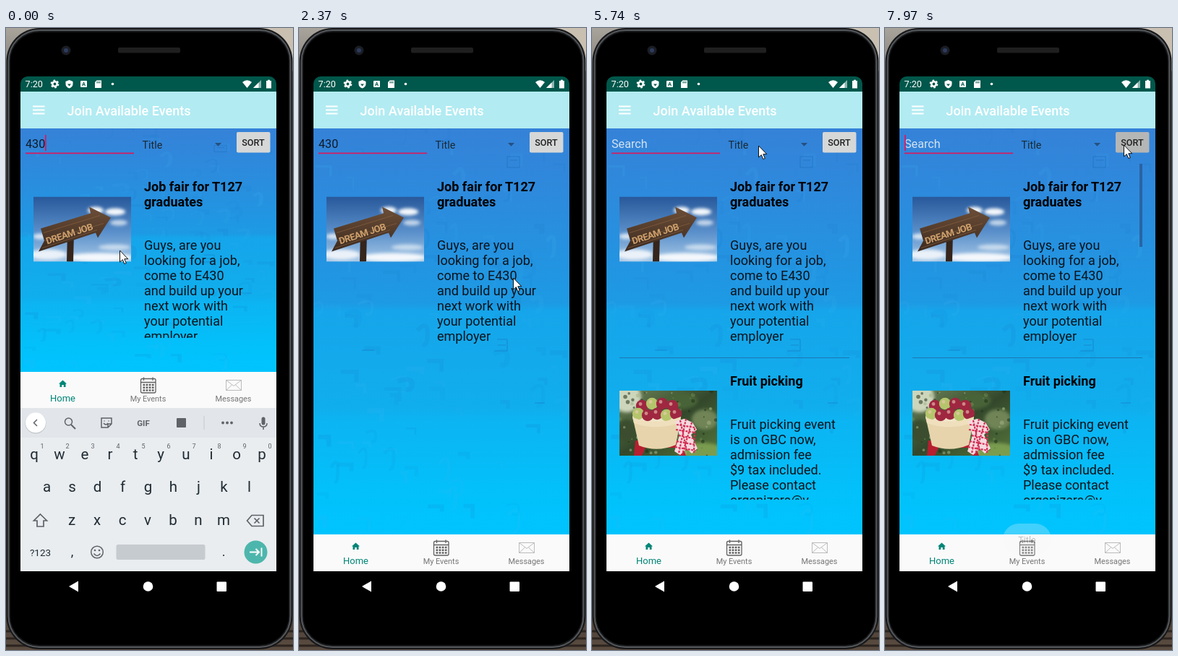
These frames come from a looping animation (397x861 px, 8 s). An HTML page:

```html
<!DOCTYPE html>
<html lang="en">
<head>
<meta charset="utf-8">
<title>Event list</title>
<style>
html, body { margin: 0; width: 100%; height: 100%; overflow: hidden; background: #000; }
svg { display: block; width: 100%; height: 100%; }
text { font-family: Roboto, sans-serif; white-space: pre; }
.mid { text-anchor: middle; }
.b { font-weight: 700; }
.line { fill: none; stroke: #5f6368; stroke-width: 1.5; }
</style>
</head>
<body>
<svg id="stage" viewBox="0 0 397 861" xmlns="http://www.w3.org/2000/svg">
  <defs>
    <linearGradient id="desk" x2="0" y2="1">
      <stop offset="0" stop-color="#a8a49c"/><stop offset=".1" stop-color="#77726b"/>
      <stop offset=".9" stop-color="#3f362f"/><stop offset="1" stop-color="#5b4c40"/>
    </linearGradient>
    <linearGradient id="sea" x2="0" y2="1">
      <stop offset="0" stop-color="#3582d8"/><stop offset=".2" stop-color="#2b8cdd"/>
      <stop offset=".43" stop-color="#1d9ae4"/><stop offset=".45" stop-color="#16a5ea"/>
      <stop offset=".69" stop-color="#10aeed"/><stop offset=".72" stop-color="#0cb4f2"/>
      <stop offset=".9" stop-color="#02c1fb"/><stop offset="1" stop-color="#00c4fe"/>
    </linearGradient>
    <linearGradient id="sky" x2="0" y2="1">
      <stop offset="0" stop-color="#28589a"/><stop offset=".55" stop-color="#5a90cb"/>
      <stop offset="1" stop-color="#a9c9e6"/>
    </linearGradient>
    <linearGradient id="wood" x2="0" y2="1">
      <stop offset="0" stop-color="#6d4f38"/><stop offset="1" stop-color="#3c2a1f"/>
    </linearGradient>
    <linearGradient id="leaf" x2="1" y2="1">
      <stop offset="0" stop-color="#6f8459"/><stop offset=".5" stop-color="#33482b"/>
      <stop offset="1" stop-color="#55753c"/>
    </linearGradient>
    <filter id="soft"><feGaussianBlur stdDeviation="2.2"/></filter>
    <clipPath id="screen"><path d="M20 752V77a10 10 0 0 1 10-10H364a10 10 0 0 1 10 10V752Z"/></clipPath>
    <clipPath id="photo"><rect width="135" height="90"/></clipPath>
    <clipPath id="rowClip"><rect id="rowBox" x="180" y="188" width="180" height="241"/></clipPath>
    <clipPath id="row2Clip"><rect x="180" y="460" width="180" height="193"/></clipPath>
  </defs>

  <rect width="397" height="861" fill="url(#desk)"/>
  <path d="M340 0H397V60Z" fill="#c9c0b2"/>
  <path d="M0 835H397M0 845H397M0 855H397" stroke="#2b241f" stroke-width="3"/>
  <rect x=".5" y="0" width="396" height="860" rx="46" fill="#17181a"/>
  <rect x="3.500" y="3" width="390" height="854" rx="43" fill="none" stroke="#55585b" stroke-width="2"/>
  <rect x="6" y="6" width="385" height="848" rx="40" fill="#000"/>
  <circle cx="83" cy="31" r="6.500" fill="#1b1d24"/><circle cx="83" cy="31" r="3" fill="#2c3a5c"/>
  <rect x="155" y="27" width="86" height="7.500" rx="2" fill="#1f1f20"/>

  <g clip-path="url(#screen)">
    <g id="back"><rect width="354" height="562" fill="url(#sea)"/><g id="marks" fill="none"></g></g>

    <path d="M20 67H374V88H20Z" fill="#00574b"/>
    <g fill="#fff">
      <text x="26.500" y="82" font-size="12.700">7:20</text>
      <circle cx="67.500" cy="77.500" r="3.200" fill="none" stroke="#fff" stroke-width="2.600"/>
      <circle cx="67.500" cy="77.500" r="5" fill="none" stroke="#fff" stroke-width="1.800" stroke-dasharray="2.600 2.640"/>
      <path d="M87.500 72l5 2v3.500q0 4-5 6-5-2-5-6V74Z"/><path d="M85 77.500h5l-2.500 3Z" fill="#00574b"/>
      <rect x="103" y="73" width="9" height="9" rx="1"/>
      <text x="107.500" y="80.300" class="mid b" font-size="7.500" style="fill:#00574b">A</text>
      <path d="M125.500 72.500H132V83h-9v-8Z"/><path d="M126 74v2.500M128 74v2.500M130 74v2.500" stroke="#00574b"/>
      <circle cx="147.500" cy="77.500" r="1.800"/>
      <path d="M327 75q6.500-5.500 13 0l-6.500 8Z"/>
      <path d="M353 72v11h-11Z" opacity=".55"/><path d="M349.500 75.500V83H342Z"/>
      <path d="M360 73h2v-1.200h3V73h2v10.500h-7Z"/>
    </g>
    <path d="M20 88H374V139H20Z" fill="#b2ebf2"/>
    <path d="M37 108.500H53.500M37 113.500H53.500M37 118.500H53.500" stroke="#fff" stroke-width="1.800"/>
    <text x="84.500" y="120.800" font-size="18" font-weight="500" fill="#fff">Join Available Events</text>

    <text id="query" x="27" y="165.500" font-size="16.200">430</text>
    <path d="M27 173.300H177" stroke="#d81b60" stroke-width="1.800"/>
    <rect id="caret" y="148" width="1.800" height="22" fill="#d81b60"/>
    <text x="188.500" y="166.500" font-size="14.300" fill="#1c2733">Title</text>
    <path d="M289 159h9l-4.500 4.700Z" fill="#24507f"/>
    <rect id="sort" x="319" y="144" width="46.500" height="28.500" rx="2"/>
    <text x="342" y="163" class="mid" font-size="12.600" font-weight="500" fill="#222">SORT</text>

    <g transform="translate(38 233.500)" clip-path="url(#photo)">
      <rect width="135" height="90" fill="url(#sky)"/>
      <g fill="#f4f8fc" filter="url(#soft)">
        <ellipse cx="86" cy="19" rx="11" ry="5"/><ellipse cx="113" cy="21" rx="14" ry="5"/>
        <ellipse cx="118" cy="36" rx="12" ry="4" opacity=".7"/>
        <ellipse cx="10" cy="55" rx="11" ry="4" opacity=".8"/><ellipse cx="20" cy="80" rx="26" ry="7" opacity=".9"/>
        <ellipse cx="112" cy="70" rx="22" ry="4" opacity=".6"/><ellipse cx="92" cy="84" rx="46" ry="6"/>
      </g>
      <path d="M47 50h9l-1 40h-9Z" fill="#35251c"/>
      <path d="M10 44L79 23 77 14 107 29 89 57 86 50 7 76l8-15Z" fill="url(#wood)"/>
      <path d="M14 50L92 26M16 61L97 37M12 71L88 46" stroke="#8f6644" stroke-width="1" opacity=".6" fill="none"/>
      <text class="b" transform="translate(19 66) rotate(-18)" font-size="13" fill="#cda06c" letter-spacing="-.55">DREAM JOB</text>
    </g>
    <g clip-path="url(#rowClip)">
      <g id="first"></g>
    </g>
    <g id="more">
      <path d="M38 456.500H356" stroke="#1d76b2"/>
      <g transform="translate(38 502)" clip-path="url(#photo)">
        <rect width="135" height="90" fill="url(#leaf)"/>
        <g filter="url(#soft)">
          <ellipse cx="10" cy="10" rx="20" ry="20" fill="#cdd5bb"/><ellipse cx="118" cy="40" rx="18" ry="14" fill="#6f8456"/>
          <ellipse cx="86" cy="14" rx="22" ry="11" fill="#4a6338"/><ellipse cx="113" cy="84" rx="32" ry="12" fill="#7a9c50"/>
          <ellipse cx="10" cy="56" rx="14" ry="16" fill="#3a4d2d"/>
        </g>
        <g id="leaves"></g>
        <path d="M22 69H84L92 90H83L77 79H36L31 90H20Z" fill="#b51f30"/>
        <path d="M18 36Q52 28 85 36L78 75Q52 86 27 76Z" fill="#e7d4ac"/>
        <ellipse cx="51.500" cy="36" rx="33.500" ry="7" fill="#f0e4c8"/>
        <g id="apples"></g>
        <path d="M18 37Q51 50 85 36L84 44Q52 56 20 45Z" fill="#f0dfbc"/>
        <g id="cloth">
          <path d="M77 42l13-3 11 5 6 10-8 7 9 19-8 7-7-7-9 9-8-5 7-22Z" fill="#f6d9df"/>
          <path d="M79 47l25 4M78 54l27 4M82 62l20 4M79 70l26 5M77 78l28 5M84 41l9 42M92 39l-10 48M100 44l-13 44M104 52l-1 34" stroke="#d33156" stroke-width="2.200" stroke-dasharray="3 1.500" fill="none"/>
        </g>
      </g>
      <g clip-path="url(#row2Clip)"><g id="second"></g></g>
    </g>
    <rect id="bar" x="352" y="188" width="4" height="115" fill="#285d99" opacity=".85"/>

    <g id="menu">
      <rect x="180" y="140" width="93" height="132" rx="3" opacity=".22" filter="url(#soft)"/>
      <rect x="181" y="139" width="91" height="130" rx="2" fill="#f5f5f5"/>
      <path d="M181 139H272V182H181Z" fill="#d2d2d2"/>
      <g id="choices"></g>
    </g>

    <g id="nav">
      <path d="M20 0H374V51H20Z" fill="#fafafa"/>
      <path d="M78.500 11.500l5.500 5h-1.500V21h-2.700v-3h-2.600v3h-2.700v-4.500H73Z" fill="#008577"/>
      <text x="78.500" y="41" class="mid" font-size="13" fill="#008577">Home</text>
      <g fill="none" stroke="#616161" stroke-width="1.300">
        <rect x="186.500" y="9.500" width="20.500" height="19.500" rx="2"/><path d="M186.500 14.500h20.500M190.500 7.500v4.500M203 7.500v4.500"/>
        <path d="M189.500 18H204.500M189.500 21.800H204.500M189.500 25.600H204.500" stroke-width="2.500" stroke-dasharray="2.700 1.400"/>
      </g>
      <text x="196.500" y="41" class="mid" font-size="10.900" fill="#757575">My Events</text>
      <path d="M304.500 11.500h21v14h-21Zl10.500 8 10.500-8M304.500 25.500l8-7.500M325.500 25.500l-8-7.500" fill="none" stroke="#b5b5b5" stroke-width=".9"/>
      <text x="314.500" y="41" class="mid" font-size="10.900" fill="#757575">Messages</text>
    </g>

    <g id="keys">
      <path d="M20 526H374V752H20Z" fill="#e9edf0"/><path d="M20 526H374V567H20Z" fill="#e2e6ea"/>
      <circle cx="41" cy="547" r="14.500" fill="#bfc4c9"/><circle cx="41" cy="546.300" r="14" fill="#fff"/>
      <g class="line">
        <path d="M43 542l-4.500 4.500 4.500 4.500"/>
        <circle cx="86.500" cy="545" r="5"/><path d="M90 549l6 6" stroke-width="2"/>
        <path d="M132 540h14v8l-5 5h-9ZM146 548h-5v5M135 547q3.500 4 6 0M136 543.500v1M142 543.500v1"/>
        <path d="M274 537V556" stroke="#c5c9ce" stroke-width="1"/>
        <path d="M351 547q0 5 5 5t5-5M356 552v4"/>
        <path d="M47.500 673l9 9h-4.500v8h-9v-8h-4.500Z" stroke-width="1.700"/>
        <path d="M340 674.500H356v15H340L333.500 682ZM343.500 678.500l7 7M350.500 678.500l-7 7" stroke-width="1.700"/>
        <circle cx="126" cy="725.500" r="8.300"/><path d="M121.500 727.500q4.500 6 9 0"/>
      </g>
      <g fill="#5f6368">
        <text x="190" y="550.500" class="mid b" font-size="11.500">GIF</text>
        <rect x="236" y="540" width="13" height="13" rx="1"/>
        <circle cx="300" cy="546.500" r="1.900"/><circle cx="306" cy="546.500" r="1.900"/><circle cx="312" cy="546.500" r="1.900"/>
        <rect x="353.500" y="538.500" width="5" height="11" rx="2.500"/>
        <circle cx="123" cy="723" r="1.300"/><circle cx="129" cy="723" r="1.300"/>
      </g>
      <g id="letters" class="mid" fill="#202b33"></g>
      <rect x="152.500" y="715" width="123" height="21" rx="2.500" fill="#c6cbcf"/>
      <circle cx="345.500" cy="725.500" r="16" fill="#4db6ac"/>
      <path d="M337 725.500H350M345.500 721l4.500 4.500-4.500 4.500M353.500 719.500v12" fill="none" stroke="#fff" stroke-width="1.900"/>
    </g>

    <g id="toast">
      <rect x="163" y="686" width="67" height="44" rx="22" fill="#f8f8f8"/>
      <text x="196.500" y="713" class="mid" font-size="12.600" fill="#222">Title</text>
    </g>
  </g>

  <g fill="#fff">
    <path d="M87 773l13-7.500v15Z"/><circle cx="196.500" cy="773" r="6.800"/><rect x="291.500" y="766.500" width="13.500" height="13.500" rx="1"/>
  </g>
  <path id="pointer" d="M.5 0V16L4.300 12.600 6.800 18.500 9.300 17.500 6.800 11.700H11.800Z" fill="#fff" stroke="#111" stroke-width="1"/>
</svg>
<script>
const LOOP = 8000;
const el = id => document.getElementById(id);
const show = (node, on) => node.setAttribute('visibility', on ? 'visible' : 'hidden');
const clamp = v => Math.max(0, Math.min(1, v));
const ramp = (t, a, b) => clamp((t - a) / (b - a));
const smooth = k => k * k * (3 - 2 * k);

function add(parent, name, attrs, text) {
  const node = document.createElementNS('http://www.w3.org/2000/svg', name);
  for (const key in attrs) node.setAttribute(key, attrs[key]);
  if (text) node.textContent = text;
  el(parent).append(node);
}

function lines(parent, list, x, y, step, size, extra = {}) {
  list.forEach((s, i) => add(parent, 'text', { x, y: y + i * step, 'font-size': size, ...extra }, s));
}

const dark = { fill: '#0a141c' };
const bold = { class: 'b', fill: '#000' };
lines('first', ['Job fair for T127', 'graduates'], 191, 226, 21, 18, bold);
lines('first', ['Guys, are you', 'looking for a job,', 'come to E430', 'and build up your',
  'next work with', 'your potential', 'employer'], 191, 307, 21, 18, dark);
lines('second', ['Fruit picking'], 191, 494.5, 21, 18, bold);
lines('second', ['Fruit picking event', 'is on GBC now,', 'admission fee', '$9 tax included.',
  'Please contact', 'organizers@v'], 191, 555, 21, 18, dark);
lines('choices', ['Title', 'Start Date', 'Most recent'], 188.5, 166.5, 43, 14.3, { fill: '#222' });

[['qwertyuiop', 39, 596.5], ['asdfghjkl', 56.5, 641.5], ['zxcvbnm', 91, 687.5]].forEach(([row, x0, y], r) => {
  [...row].forEach((c, i) => {
    const x = x0 + i * 35;
    add('letters', 'text', { x, y, 'font-size': 20.5 }, c);
    if (!r) add('letters', 'text', { x: x + 11, y: 582, 'font-size': 9, fill: '#5f6368' }, String((i + 1) % 10));
  });
});
add('letters', 'text', { x: 47.5, y: 730.5, 'font-size': 13.5 }, '?123');
add('letters', 'text', { x: 91.5, y: 731, 'font-size': 18 }, ',');
add('letters', 'text', { x: 301, y: 731, 'font-size': 18 }, '.');

let seed = 11;
const rnd = () => (seed = seed * 16807 % 2147483647) / 2147483647;

// Faint hooks and blocks in the wallpaper
for (let i = 0; i < 110; i++) {
  const x = rnd() * 340, y = rnd() * 545, w = 8 + rnd() * 14, h = 6 + rnd() * 12;
  const d = i % 3 ? `M${x} ${y}h${w}v${h}` : `M${x} ${y}q${w} ${-h} ${w} 4t${-w / 2} ${h}`;
  add('marks', 'path', { d, stroke: rnd() < 0.6 ? '#1674c4' : '#45b8f4', 'stroke-width': 2 + rnd() * 5, opacity: 0.05 + rnd() * 0.09 });
}
add('marks', 'path', { d: 'M268 39h17v15h-17ZM272 44h10M254 292h14v16h-18M255 300h11M67 307h17M306 380h14', stroke: '#1763ad', opacity: 0.45 });

// Foliage behind the bucket, then the fruit in two rows
for (let i = 0; i < 90; i++) {
  add('leaves', 'circle', { cx: rnd() * 135, cy: rnd() * 90, r: 0.8 + rnd() * 2.2, fill: ['#1f3019', '#6d8a4c', '#a3b386'][i % 3], opacity: 0.55 });
}
for (let i = 0; i < 9; i++) {
  const back = i < 4;
  const x = back ? 31 + i * 14 : 26 + (i - 4) * 13;
  const y = back ? 21 - (i % 3 ? 3 : 0) : 32 + (i % 2) * 2;
  add('apples', 'circle', { cx: x, cy: y, r: 8.2, fill: i % 3 === 1 ? '#b5c56c' : '#9f2740' });
  add('apples', 'circle', { cx: x - 2, cy: y - 2.5, r: 2.4, fill: '#f0c9b8', opacity: 0.6 });
}

// time, x, y of the pointer tip
const path = [
  [0, 157, 308], [60, 158, 312], [400, 214, 540], [770, 92, 768], [1060, 92, 768], [1200, 112, 733],
  [1480, 210, 540], [1770, 322, 360], [1860, 323, 361], [2370, 296, 346], [2640, 297, 345],
  [2850, 332, 270], [3200, 326, 160], [3480, 326, 160], [4110, 150, 174], [4820, 150, 174],
  [5030, 36, 156], [5420, 36, 156], [5740, 230, 163], [5960, 230, 163], [6220, 298, 158],
  [6340, 287, 153], [7080, 287, 153], [7320, 366, 168], [7550, 330, 162], [LOOP, 330, 162]
];
const blinks = [600, 1140, 1830, 2420, 2970, 3510, 4110, 4670, 5700, 6900, 7450, 7880];

function pointerAt(t) {
  const i = Math.max(1, path.findIndex(p => p[0] >= t));
  const a = path[i - 1], b = path[i], k = smooth(ramp(t, a[0], b[0]));
  return [a[1] + (b[1] - a[1]) * k, a[2] + (b[2] - a[2]) * k];
}

function draw(t) {
  const typing = t < 1080;
  const cleared = t >= 5420;
  el('back').setAttribute('transform', `translate(20 139) scale(1 ${typing ? 0.6 : 1})`);
  el('nav').setAttribute('transform', `translate(0 ${typing ? 476 : 701})`);
  el('rowBox').setAttribute('height', typing ? 241 : 260);
  el('keys').setAttribute('transform', `translate(0 ${226 * smooth(ramp(t, 1020, 1180))})`);

  const word = t < 5240 ? '430' : t < 5330 ? '43' : t < 5420 ? '4' : '';
  el('query').textContent = word || 'Search';
  el('query').setAttribute('fill', word ? '#111c28' : '#d3e2f2');
  el('caret').setAttribute('x', 27 + word.length * 9.1 - (word ? 0.4 : 0));
  show(el('caret'), blinks.filter(b => b <= t).length % 2 === 0);

  show(el('more'), cleared);
  show(el('bar'), t >= 6900);
  el('menu').setAttribute('opacity', ramp(t, 6060, 6240) * (1 - 0.58 * ramp(t, 6960, 7070) - 0.42 * ramp(t, 7070, 7150)));
  el('sort').setAttribute('fill', t >= 7850 ? '#b5b6b6' : '#d6d7d7');
  el('toast').setAttribute('opacity', 0.26 * ramp(t, 7880, 7970));

  el('pointer').setAttribute('transform', `translate(${pointerAt(t).map(v => v.toFixed(1)).join(' ')})`);
}

const start = performance.now();
function tick() {
  draw((performance.now() - start) % LOOP);
  requestAnimationFrame(tick);
}
tick();
</script>
</body>
</html>
```
